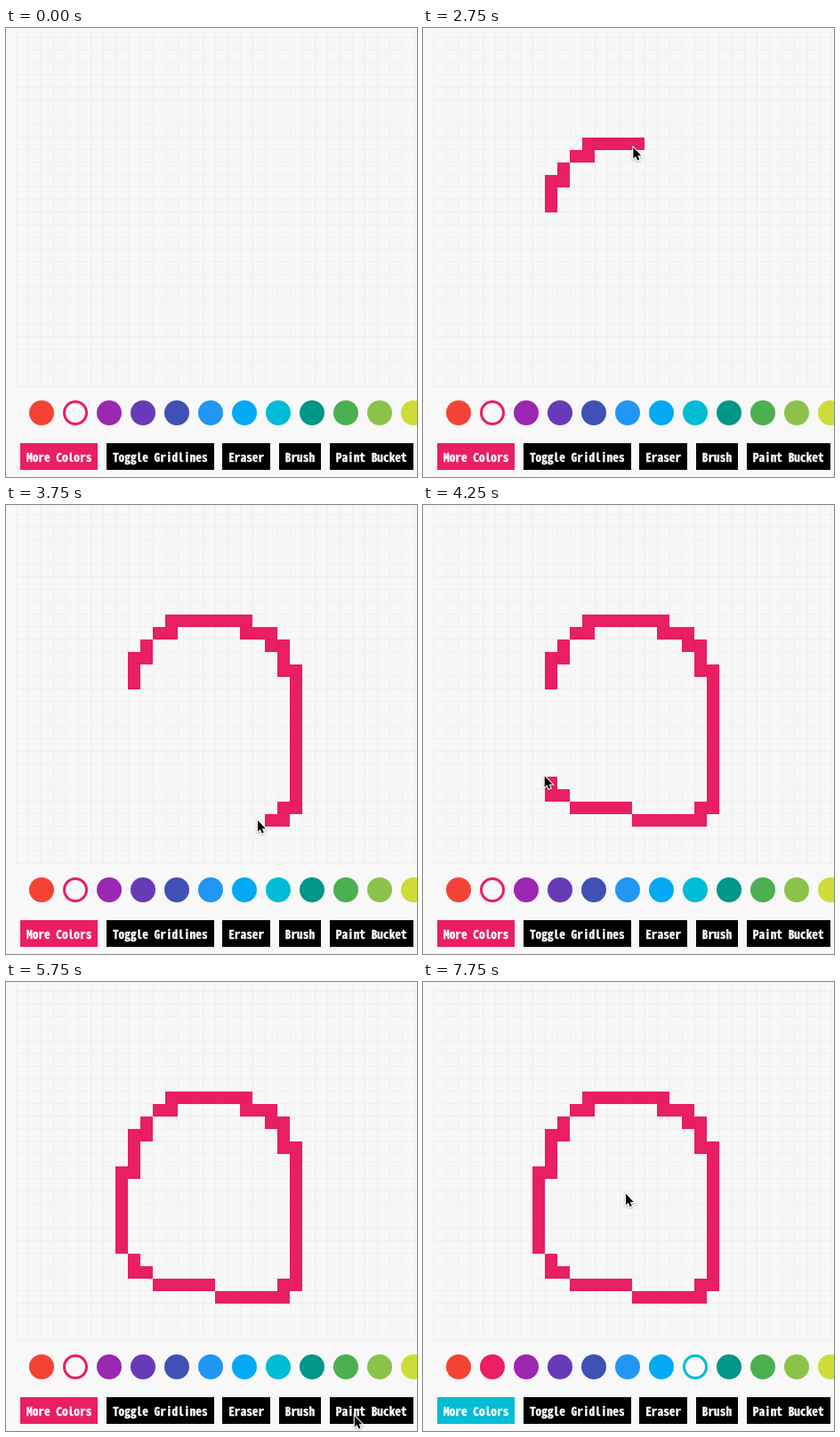
Recreate the animation shown at these times as an HTML page. Size 462 px wide and 504 px high, loop 8 s.

```html
<!DOCTYPE html>
<html lang="en">
<head>
<meta charset="utf-8">
<title>Pixel drawing</title>
<style>
  html, body { margin: 0; width: 100%; height: 100%; overflow: hidden; background: #f8f8f8; }
  svg { display: block; }
  text {
    font: bold 13.333px "Noto Sans Mono CJK JP", "Noto Sans Mono CJK SC", monospace;
    fill: #fff; stroke: #fff; stroke-width: .35px; white-space: pre;
  }
</style>
</head>
<body>
<svg width="462" height="504" viewBox="0 0 462 504">
  <defs>
    <pattern id="grid" x="11" y="11" width="14" height="14" patternUnits="userSpaceOnUse">
      <path d="M.5 0V14M1 13.5H14" stroke="#000" stroke-opacity=".03"/>
    </pattern>
    <filter id="shadow" x="-50%" y="-50%" width="200%" height="200%">
      <feDropShadow dx="0" dy="1" stdDeviation=".8" flood-opacity=".35"/>
    </filter>
  </defs>
  <rect x="11" width="451" height="403" fill="#f7f7f7"/>
  <g id="cells" fill="#e91e63" shape-rendering="crispEdges"></g>
  <rect x="11" width="451" height="403" fill="url(#grid)"/>
  <g id="swatches"></g>
  <g id="buttons" shape-rendering="crispEdges"></g>
  <path id="cursor" d="M0 0V12.5L2.8 10 4.7 14.4 6.8 13.5 4.9 9.3H8.8Z" stroke="#fff" paint-order="stroke" stroke-width="2" filter="url(#shadow)"/>
</svg>
<script>
const LOOP = 8000, STEP = 250, CELL = 14, ORIGIN = 11;
const APPEAR = 1000, PEN_DOWN = 1790, PEN_UP = 4750, PAINT_DELAY = 10, CLICK = 7000;
const PINK = 1, CYAN = 7;
const colors = ['#f44336', '#e91e63', '#9c27b0', '#673ab7', '#3f51b5', '#2196f3',
  '#03a9f4', '#00bcd4', '#009688', '#4caf50', '#8bc34a', '#cddc39'];

// Pointer path: time in ms, then column and row on the drawing grid
const route = [
  [APPEAR, 13, 12.5], [1750, 8.86, 14.36],
  [2000, 9.8, 11.3], [2250, 11, 9.99], [2350, 12.4, 8.8], [2750, 16.1, 8.79],
  [2850, 18.4, 8.7], [3000, 21.3, 10.8], [3100, 22.1, 12.9], [3700, 22.4, 23.7],
  [3750, 19.43, 24.5], [4150, 11.3, 23.32], [4200, 9.85, 22.1], [4250, 8.98, 20.95],
  [4500, 8.4, 15], [4700, 9.2, 14.5], [PEN_UP, 8.79, 14.07],
  [5500, 18.57, 29], [5750, 27.2, 34], [6750, 21.36, 30.43], [CLICK, 21.36, 30.43],
  [7750, 15.5, 16.2]];

const byId = id => document.getElementById(id);
const toPixels = units => ORIGIN + CELL * units;

function add(parent, tag, attributes) {
  const node = document.createElementNS('http://www.w3.org/2000/svg', tag);
  for (const name in attributes) node.setAttribute(name, attributes[name]);
  return byId(parent).appendChild(node);
}

function pointerAt(time) {
  const next = route.findIndex(key => key[0] > time);
  if (next < 0) return route[route.length - 1].slice(1);
  const [t0, x0, y0] = route[next - 1], [t1, x1, y1] = route[next];
  const part = (time - t0) / (t1 - t0);
  return [x0 + (x1 - x0) * part, y0 + (y1 - y0) * part];
}

// Every cell the pointer crosses with the pen down, and when it is painted
const cells = new Map();
for (let time = PEN_DOWN; time < PEN_UP; time += 5) {
  const [col, row] = pointerAt(time).map(Math.floor);
  const key = `${col},${row}`;
  if (cells.has(key)) continue;
  const node = add('cells', 'rect', { x: toPixels(col), y: toPixels(row), width: CELL, height: CELL });
  cells.set(key, { node, time: time + PAINT_DELAY });
}

const swatches = colors.map(() => add('swatches', 'circle', {}));

let buttonX = 16;
const buttons = ['More Colors', 'Toggle Gridlines', 'Eraser', 'Brush', 'Paint Bucket'].map(label => {
  const width = label.length * 20 / 3 + 14;
  const box = add('buttons', 'rect', { x: buttonX, y: 466, width, height: 30 });
  add('buttons', 'text', { x: buttonX + 7, y: 486.5 }).textContent = label;
  buttonX += width + 9.6;
  return box;
});

function drawSwatch(circle, index, selected, [px, py]) {
  const x = 40 + 38 * index, y = 432;
  const scale = Math.hypot(px - x, py - y) < 14 ? 1.2 : 1;
  const ring = selected ? 3 : 0;
  circle.setAttribute('transform', `translate(${x} ${y}) scale(${scale})`);
  circle.setAttribute('r', 14 - ring / 2);
  circle.setAttribute('fill', selected ? 'none' : colors[index]);
  circle.setAttribute('stroke', colors[index]);
  circle.setAttribute('stroke-width', ring);
}

function draw(elapsed) {
  const time = Math.floor(elapsed % LOOP / STEP) * STEP;
  const position = time < APPEAR ? [-50, -50] : pointerAt(time).map(toPixels);
  const selected = time < CLICK ? PINK : CYAN;

  for (const cell of cells.values()) {
    cell.node.setAttribute('visibility', cell.time <= time ? 'visible' : 'hidden');
  }
  swatches.forEach((circle, i) => drawSwatch(circle, i, i === selected, position));
  buttons[0].setAttribute('fill', colors[time <= CLICK ? PINK : CYAN]);
  byId('cursor').setAttribute('transform', `translate(${position})`);
}

const start = performance.now();
function tick() {
  draw(performance.now() - start);
  requestAnimationFrame(tick);
}
tick();
</script>
</body>
</html>
```
